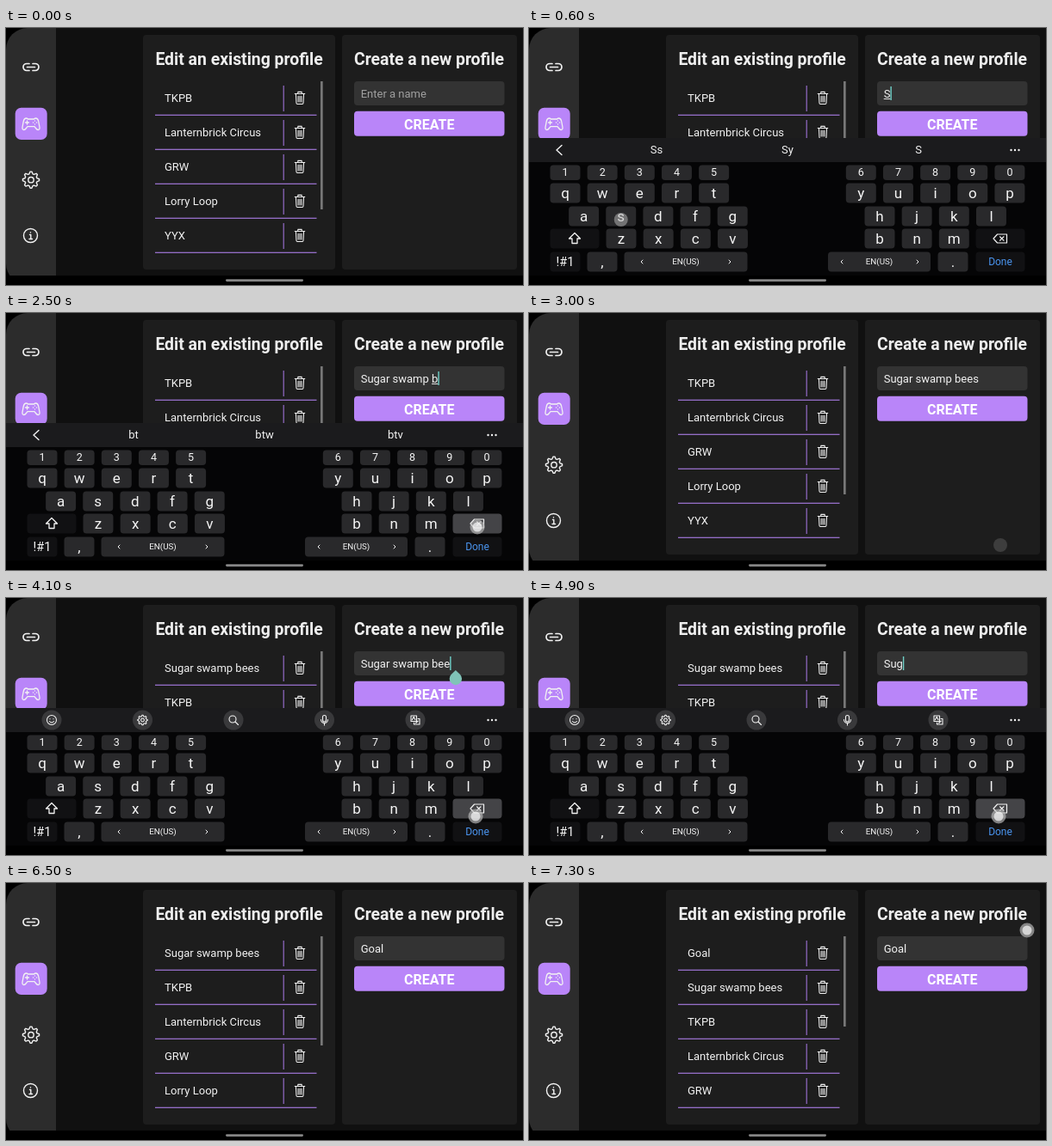
Animation of 600x299 px, one loop 7400 ms. Source, as an HTML page:

```html
<!DOCTYPE html>
<html lang="en">
<head>
<meta charset="utf-8">
<title>Profiles</title>
<style>
html, body { margin: 0; width: 100%; height: 100%; overflow: hidden; background: #000; }
svg { display: block; width: 100%; height: 100%; font-family: Roboto, sans-serif; }
</style>
</head>
<body>
<svg id="stage" viewBox="0 0 600 299"></svg>
<script>
const LOOP = 7400, STEP = 100;
const stage = document.getElementById('stage');
const ruler = document.createElement('canvas').getContext('2d');
ruler.font = '13px Roboto, sans-serif';
const width = s => ruler.measureText(s).width;

// Drawing helpers
const rect = (x, y, w, h, fill, r = 0) =>
  `<rect x="${x}" y="${y}" width="${w}" height="${h}" rx="${r}" fill="${fill}"/>`;
const disc = (x, y, r, fill) => `<circle cx="${x}" cy="${y}" r="${r}" fill="${fill}"/>`;
const text = (s, x, y, size = 13, fill = '#f2f2f2', anchor = 'middle', weight = 400) =>
  `<text x="${x}" y="${y + size * .355}" font-size="${size}" fill="${fill}" text-anchor="${anchor}" font-weight="${weight}">${s}</text>`;
const icon = (x, y, d, w = 1.2, scale = 1) =>
  `<path transform="translate(${x} ${y}) scale(${scale})" d="${d}" fill="none" stroke="#f2f2f2" stroke-width="${w}" stroke-linecap="round" stroke-linejoin="round"/>`;
const ring = (r, x = 0, y = 0) => `M${x - r} ${y}a${r} ${r} 0 1 0 ${2 * r} 0a${r} ${r} 0 1 0 ${-2 * r} 0`;

const gear = 'M' + Array.from({ length: 32 }, (_, i) => {
  const a = (i - .5) * Math.PI / 16, r = i % 4 < 2 ? 9.6 : 7.2;
  return `${(r * Math.sin(a)).toFixed(2)} ${(-r * Math.cos(a)).toFixed(2)}`;
}).join('L') + 'Z' + ring(3.2);
const link = 'M-2-4H-5A4 4 0 0 0-5 4H-2M2-4H5A4 4 0 0 1 5 4H2M-4.5 0H4.5';
const pad = 'M-5.5-6.5Q-8-6.5-8.7-3L-10 4Q-10.3 7-8.2 7Q-7 7-5.5 5L-4 3.2H4L5.5 5Q7 7 8.2 7Q10.3 7 10 4L8.7-3Q8-6.5 5.5-6.5Q4.5-6.5 3.5-5.5H-3.5Q-4.5-6.5-5.5-6.5Z' +
  'M-6.5-1.5h4M-4.5-3.5v4M4.5-3.6v.1M4.5.5v.1M2.5-1.5h.1M6.5-1.5h.1';
const trash = 'M-6-5H6M-2.3-5V-7.2H2.3V-5M-4.8-5L-4.2 6.2Q-4.1 7.4-3 7.4H3Q4.1 7.4 4.2 6.2L4.8-5M-2-2.2V4.8M0-2.2V4.8M2-2.2V4.8';
const info = ring(8) + 'M-1-1H.3V4M-1.5 4H2M0-3.8v.2';
const smile = ring(5.5) + 'M-2-1.5v.2M2-1.5v.2M-2.5 1.5Q0 4.2 2.5 1.5';
const lens = ring(4, -1, -1) + 'M2 2L5.5 5.5';
const mic = 'M-2-3.5a2 2 0 0 1 4 0V0a2 2 0 0 1-4 0ZM-4-.5a4 4 0 0 0 8 0M0 3.5V6';
const translate = 'M-5-5H1.5V1.5H-5ZM3-1.5H5V5H-1.5V3M-3.6-.3L-1.8-3.8L0-.3M.5 3.5L3.2 1';
const shift = 'M0-6.5L6.5 0H3V5.5H-3V0H-6.5Z';
const erase = 'M-8 0L-3.5-5H7.5V5H-3.5ZM4-2.2L-.5 2.2M-.5-2.2L4 2.2';

// Keyboard layout: key -> box and label
const keys = [];
const spot = { in: [500, 76], create: [492, 113], corner: [578, 55] };
function key(id, x, y, w, label = id, size = 17, fill = '#29292b') {
  keys.push({ id, x, y, w, label, size, fill });
  spot[id] = [x, y + 4];
}
function row(chars, x, y, size) {
  [...chars].forEach((c, i) => key(c, x + 43.15 * i, y, 35, c, size));
}
row('12345', 42, 168, 12.5);
row('67890', 385.3, 168, 12.5);
row('qwert', 42, 192);
row('yuiop', 385.3, 192);
row('asdfg', 63.6, 219);
row('hjkl', 407, 219);
row('zxcv', 107, 245);
row('bnm', 407, 245);
key('shift', 53, 245, 57, '', 0, '#111113');
key('<', 547, 245, 57, '', 0, '#111113');
key('!#1', 42, 272, 35, '!#1', 14.5, '#111113');
key(',', 85, 272, 35);
key('left', 182, 272, 143, 'EN(US)', 9.8);
key(' ', 406.5, 272, 119, 'EN(US)', 9.8);
key('.', 492, 272, 35);
key('done', 547, 272, 57, 'Done', 12, '#111113');
spot[' '] = [455, 276];
spot.r = [163, 201];
spot.done = [547, 270];

// Taps: step, key, steps held
const taps = [[1, 'in'],
  [5, 's'], [7, 'u'], [9, 'g'], [11, 'a'], [13, 'r'], [14, ' '],
  [15, 's'], [16, 'w'], [17, 'a'], [18, 'm'], [19, 'p'], [20, ' '],
  [21, 'b'], [22, 't'], [25, '<'], [26, 'e'], [27, 'e'], [27, 's'], [28, 'done'],
  [33, 'create'], [36, 'in'], [41, '<', 10],
  [51, 'g'], [52, 'o'], [53, 'a'], [54, 'l'], [59, 'done'],
  [66, 'create'], [73, 'corner']];

function stateAt(step) {
  const s = { value: '', names: ['TKPB', 'Lanternbrick Circus', 'GRW', 'Lorry Loop', 'YYX'],
    added: 0, focus: false, opened: 0, composing: false, mark: 0 };
  for (const [at, id, hold = 1] of taps) {
    if (at > step) break;
    if (id === 'in') {
      Object.assign(s, { focus: true, opened: at, composing: false, mark: width(s.value) });
    } else if (id === 'done') {
      if (step > at) s.focus = s.composing = false;
    } else if (id === 'create') {
      if (step > at) { s.names.unshift(s.value); s.added++; }
    } else if (id === '<') {
      const k = Math.min(step - at, hold - 1);
      const n = k < 4 ? 1 : Math.floor(1 + 2.5 * (k - 3));
      s.value = s.value.slice(0, Math.max(0, s.value.length - n));
    } else if (id.length === 1) {
      s.value += s.value ? id : id.toUpperCase();
      s.composing = true;
    }
  }
  return s;
}

function suggestions(value) {
  const word = value.trim().split(' ').pop();
  if (word[0] === 'b' && word.length < 3) return ['bt', 'btw', 'btv'];
  if (word === 'Goal') return ['Goal', 'Goalies', ''];
  return [word + 's', word + 'y', word];
}

function ball(x, y) {
  let out = disc(x, y, 7, '#eee') + disc(x, y, 2.3, '#222');
  for (let i = 0; i < 5; i++) {
    const a = i * Math.PI * .4 - Math.PI / 2;
    out += disc(x + 5.4 * Math.cos(a), y + 5.4 * Math.sin(a), 1.5, '#222');
  }
  return out;
}

function keyboard(s, step) {
  let out = rect(0, 128, 600, 171, '#050506') + rect(0, 128, 600, 28, '#1b1b1d');
  if (s.composing && s.value) {
    out += icon(35, 142, 'M3-5.5L-3 0L3 5.5', 1.4);
    suggestions(s.value).forEach((w, i) => out += w ? text(w, 148 + 152 * i, 141.7) : ball(452, 142));
  } else {
    [smile, gear, lens, mic, translate].forEach((d, i) => {
      const x = 53 + 105.5 * i;
      out += disc(x, 142, 11.5, '#39393b') + icon(x, 142, d, d === gear ? 1.8 : 1.1, d === gear ? .6 : 1);
    });
  }
  for (const x of [559.5, 564, 568.5]) out += disc(x, 142, 1.2, '#f2f2f2');
  const held = taps.some(([at, id, hold = 1]) => id === '<' && step >= at && step < at + hold);
  for (const k of keys) {
    const top = k.y === 168 ? 159.5 : k.y - 11.5, h = k.y === 168 ? 17.5 : 23;
    const label = k.label.length === 1 && !s.value ? k.label.toUpperCase() : k.label;
    out += rect(k.x - k.w / 2, top, k.w, h, k.id === '<' && held ? '#444447' : k.fill, 4);
    out += text(label, k.x, k.y, k.size, k.id === 'done' ? '#4a94ee' : '#f5f5f5');
  }
  out += icon(53, 245, shift, 1.3) + icon(547, 245, erase, 1.2);
  for (const [a, b] of [[131, 233], [363, 451]]) {
    out += icon(a, 272, 'M1-2L-1 0L1 2', 1) + icon(b, 272, 'M-1-2L1 0L-1 2', 1);
  }
  return out;
}

function app(s, step) {
  let out = rect(58, 0, 542, 288, '#101010') +
    '<path d="M25 0H58V299H25A25 25 0 0 1 0 274V25A25 25 0 0 1 25 0Z" fill="#2c2c2c"/>' +
    rect(10.7, 92.7, 37, 37.4, '#b985f9', 7) +
    icon(29, 45.5, link, 1.7) + icon(29, 111.5, pad, 1.3) + icon(29, 176.7, gear, 1.4) + icon(28.5, 241.5, info, 1.4) +
    rect(159, 8, 223, 273, '#1d1d1d', 4) + rect(390, 8, 203, 273, '#1d1d1d', 4) +
    text('Edit an existing profile', 270.5, 36, 19.4, '#eee', 'middle', 700) +
    text('Create a new profile', 491, 36, 19.4, '#eee', 'middle', 700);
  s.names.slice(0, 5).forEach((name, i) => {
    const y = 81.7 + 40 * i;
    out += text(name, 184, y, 13, '#f2f2f2', 'start') + rect(321.6, y - 14.7, 1.2, 30, '#946bc8') +
      rect(173, y + 19, 187.5, 1.2, '#a076d8') + icon(341, y - .4, trash, 1.1, .96);
  });
  out += rect(365, 62, 2.7, 149 - 22 * s.added, '#777') +
    rect(404, 62, 174.5, 28, '#333', 4) + rect(404, 96.7, 174.5, 29, '#b985f9', 4) +
    text('CREATE', 491.2, 112, 16, '#fff', 'middle', 700);
  out += s.value ? text(s.value, 411.7, 76, 13, '#f2f2f2', 'start') : text('Enter a name', 411.7, 76, 13, '#a0a0a0', 'start');
  const end = 411.7 + width(s.value);
  if (s.composing && s.value && !s.value.endsWith(' ')) {
    const from = 411.7 + width(s.value.slice(0, s.value.lastIndexOf(' ') + 1));
    out += rect(from, 82, end - from, 1, '#e0e0e0');
  }
  if (s.focus && step < 57) out += rect(end, 68, 1.4, 16, '#6fd0c8');
  if (s.focus && s.mark && step < 43) {
    out += `<path transform="translate(${411.7 + s.mark} 84)" d="M0 0L5.2 5A7.2 7.2 0 1 1-5.2 5Z" fill="#80c3b8"/>`;
  }
  return out;
}

// A released touch fades over two steps
function touches(step) {
  return taps.map(([at, id, hold = 1]) => {
    const [x, y] = id === '<' && hold > 1 ? [545, 254] : spot[id];
    const age = step - at - hold;
    if (step < at || age > 1) return '';
    if (age < 0) return disc(x, y, 8.5, 'rgba(190,190,190,.65)') + disc(x, y, 5.5, 'rgba(255,255,255,.65)');
    return disc(x, y, 8, `rgba(190,190,190,${age ? .2 : .5})`);
  }).join('');
}

function draw(step) {
  const s = stateAt(step);
  let out = app(s, step);
  if (s.focus && step > s.opened) {
    const drop = step === s.opened + 1 ? 60 : 0;
    out += `<g transform="translate(0 ${drop})">${keyboard(s, step)}</g>`;
  }
  out += rect(0, 288, 600, 11, '#000') + rect(255, 292.2, 90, 2.7, '#858585', 1.3);
  stage.innerHTML = out + touches(step);
}

let last = -1;
function tick() {
  const step = Math.floor(performance.now() % LOOP / STEP);
  if (step !== last) draw(last = step);
  requestAnimationFrame(tick);
}
tick();
</script>
</body>
</html>
```
